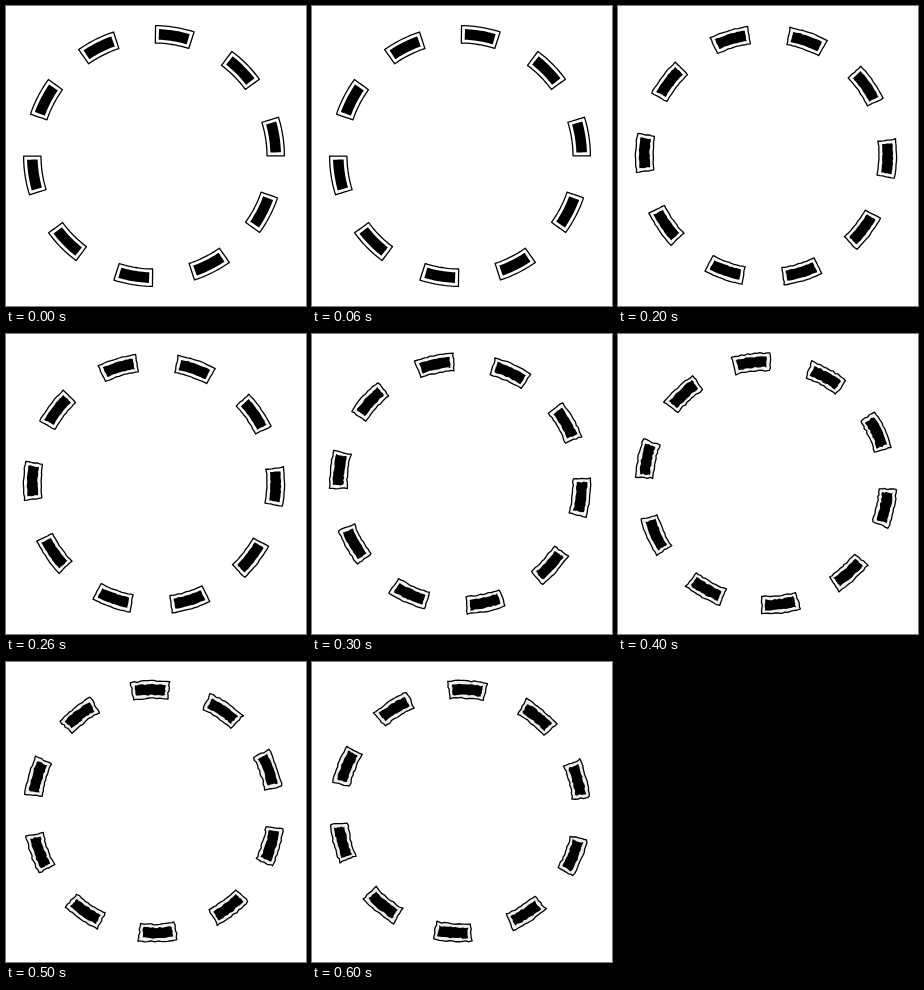
Recreate the animation shown at these times as an HTML page. Size 300 by 300 pixels, loop 700 ms.

```html
<!DOCTYPE html>
<html lang="en">
<head>
<meta charset="utf-8">
<title>Rotating dashed ring</title>
<style>
  html, body { margin: 0; width: 100%; height: 100%; overflow: hidden; background: #fff; }
  svg { display: block; width: 100vw; height: 100vh; }
</style>
</head>
<body>
<svg viewBox="0 0 300 300">
  <g id="ring">
    <path id="frame" stroke="#000" stroke-width="1.3" stroke-linejoin="round"/>
    <path id="core" fill="#000"/>
  </g>
</svg>
<script>
const DASHES = 10, STEPS = 7, STEP_MS = 100;
const START_DEG = 9.3, TURN_DEG = 5;
const RADIUS = 121.7, HALF_DEPTH = 8.7, HALF_LENGTH = 18.3, BORDER = 3.4;
const RAD = Math.PI / 180;
const [ring, frame, core] = ['ring', 'frame', 'core'].map(id => document.getElementById(id));

function seeded(seed) {
  return () => {
    seed = (seed * 16807) % 2147483647;
    return seed / 2147483647 - 0.5;
  };
}

// Ring segment whose edges grow rougher with the given amount.
function segment(angle, inset, rough, random) {
  const depth = HALF_DEPTH - inset;
  const half = (HALF_LENGTH - inset) / RADIUS;
  const points = [];
  const edge = (count, place) => {
    for (let i = 0; i < count; i++) {
      const [a, r] = place(i / count * 2 - 1);
      const theta = angle + a + random() * rough / RADIUS;
      const radius = RADIUS + r + random() * rough;
      points.push((radius * Math.sin(theta)).toFixed(2) + ' ' + (-radius * Math.cos(theta)).toFixed(2));
    }
  };
  edge(12, u => [half * u, depth]);
  edge(6, u => [half, -depth * u]);
  edge(12, u => [-half * u, -depth]);
  edge(6, u => [-half, depth * u]);
  return 'M' + points.join('L') + 'Z';
}

function draw(step) {
  const random = seeded(4021 + step * 977);
  const rough = Math.min(1.3, step * 0.35);
  const shade = 255 - step * 3;
  let outer = '', inner = '';
  for (let i = 0; i < DASHES; i++) {
    const angle = (START_DEG + step * TURN_DEG + i * 360 / DASHES) * RAD;
    outer += segment(angle, 0, rough, random);
    inner += segment(angle, BORDER, rough, random);
  }
  ring.setAttribute('transform', `translate(148 ${150 - step * 0.15})`);
  frame.setAttribute('d', outer);
  frame.setAttribute('fill', `rgb(${shade},${shade},${shade})`);
  core.setAttribute('d', inner);
}

let shown = -1;
const start = performance.now();
function tick() {
  const step = Math.floor((performance.now() - start) / STEP_MS) % STEPS;
  if (step !== shown) draw(shown = step);
  requestAnimationFrame(tick);
}
tick();
</script>
</body>
</html>
```
